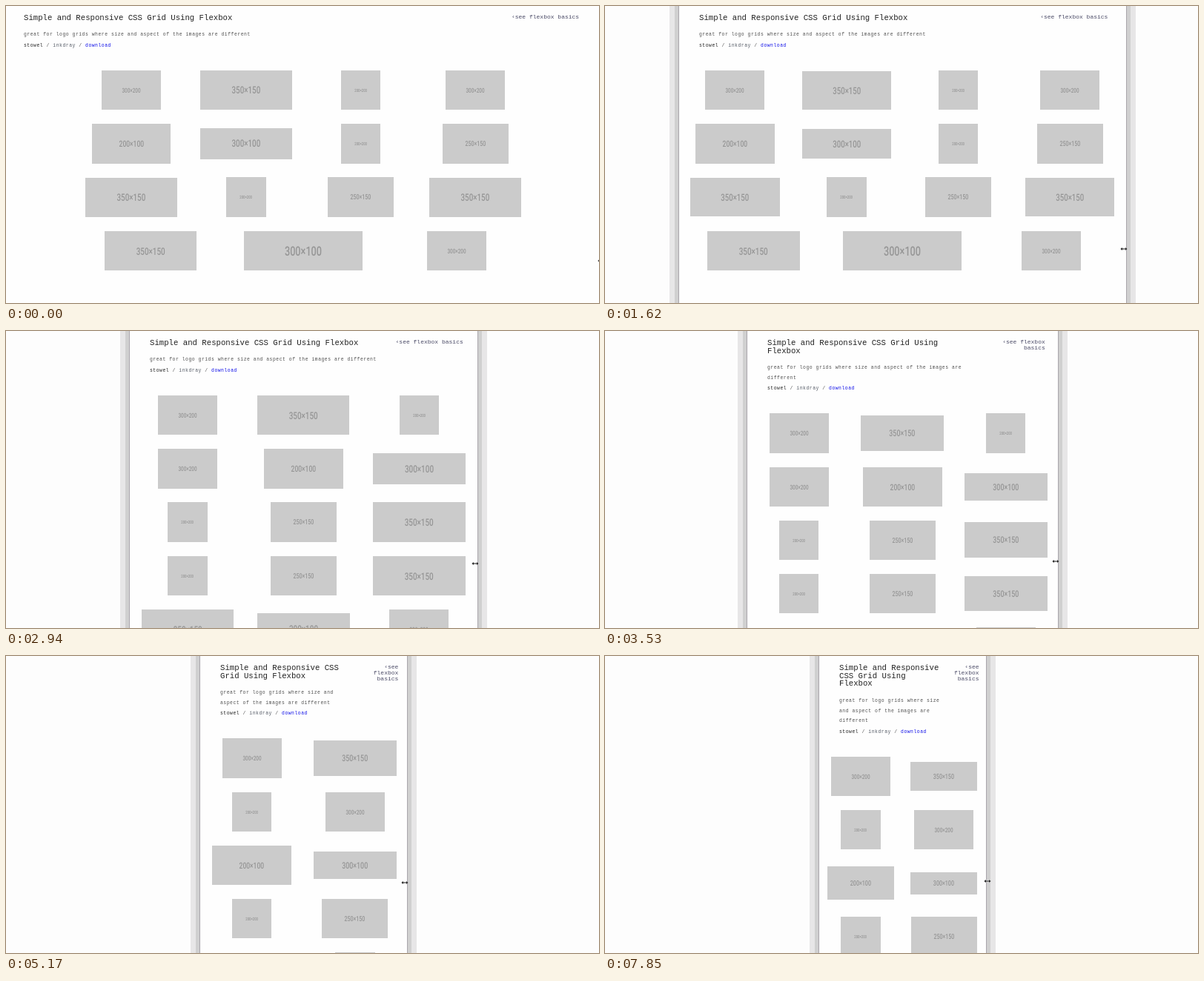
Recreate the animation shown at these times as an HTML page. Size 800 by 401 pixels, loop 7990 ms.

```html
<!DOCTYPE html>
<html lang="en">
<head>
<meta charset="utf-8">
<title>Responsive grid</title>
<style>
  html, body { margin: 0; width: 100%; height: 100%; overflow: hidden; background: #fdfdfd; }
  body { position: relative; font-family: "Liberation Mono", monospace; }
  #page {
    position: absolute; top: -20px; height: 441px; box-sizing: border-box; padding-top: 30.8px;
    overflow: hidden; background: #fefefe;
    box-shadow: 0 0 0 1px #aaa6ac, 0 0 0 6px #d0d0d0, 0 0 0 13px #e7e6e7;
  }
  header { margin: 0 0 17px 27px; width: calc(74% - 30px); }
  h1 { margin: 0 0 10.9px; font: 10.67px/10.8px "Liberation Mono", monospace; color: #222; }
  p { margin: 0 0 1.2px; font-size: 6.4px; line-height: 13.5px; letter-spacing: .533px; color: #505050; }
  .repo { color: #222; }
  .pen { color: #555b66; }
  .get { color: #1010e8; }
  #basics {
    position: absolute; top: 30.8px; right: 4%; width: 20%;
    font-size: 8px; line-height: 8px; text-align: right; color: #4a4a66;
  }
  #grid { display: flex; flex-wrap: wrap; max-width: 619px; margin: auto; }
  .cell { flex: 1 1 calc(96% / var(--columns)); height: 72.15px; display: flex; align-items: center; justify-content: center; }
  .cell svg { max-width: 80%; height: auto; background: #cbcbcb; }
  .cell text { font-family: Roboto, sans-serif; font-weight: 500; fill: #969696; text-anchor: middle; text-rendering: geometricPrecision; }
  #cursor { position: absolute; width: 10px; height: 6px; margin: -3px 0 0 -5px; }
</style>
</head>
<body>
<div id="page">
  <div id="basics">‹see flexbox basics</div>
  <header>
    <h1>Simple and Responsive CSS Grid Using Flexbox</h1>
    <p>great for logo grids where size and aspect of the images are different</p>
    <p><span class="repo">stowel</span> / <span class="pen">inkdray</span> / <span class="get">download</span></p>
  </header>
  <div id="grid"></div>
</div>
<svg id="cursor" viewBox="-5 -3 10 6">
  <path d="M-4.7 0L-2-2.3V-.7H2V-2.3L4.7 0L2 2.3V.7H-2V2.3Z" fill="#111" stroke="#fff" stroke-width=".4"/>
</svg>
<script>
const LOOP = 7990, STEP = 147.7, CENTER = 401.25, MAX_HEIGHT = 53.33;
const SIZES = ('300×200 350×150 200×200 300×200 200×100 300×100 200×200 250×150 ' +
  '350×150 200×200 250×150 350×150 350×150 300×100 300×200').split(' ');

// [step, left edge of the window, cursor y]
const DRAG = [
  [0, -3, 344], [8, 69, 334], [11, 100, 328], [16, 144, 320], [20, 167, 314], [24, 192, 311],
  [28, 214, 308], [32, 244, 307], [35, 262, 306], [40, 278, 305], [46, 289, 304]
];

const page = document.getElementById('page');
const grid = document.getElementById('grid');
const cursor = document.getElementById('cursor');

grid.innerHTML = SIZES.map(label => {
  const [w, h] = label.split('×').map(Number);
  return `<div class="cell"><svg viewBox="0 0 ${w} ${h}" width="${MAX_HEIGHT * w / h}">
    <text transform="translate(${w / 2} ${h / 2 + w * .039}) scale(.73 1)" font-size="${w * .109}">${label}</text>
  </svg></div>`;
}).join('');

function dragAt(step) {
  const next = DRAG.findIndex(key => key[0] > step);
  if (next < 0) return DRAG[DRAG.length - 1].slice(1);
  const a = DRAG[next - 1], b = DRAG[next];
  const f = (step - a[0]) / (b[0] - a[0]);
  return [1, 2].map(i => a[i] + (b[i] - a[i]) * f);
}

function draw(now) {
  const step = Math.floor((now % LOOP + 16) / STEP);
  const [left, y] = dragAt(step);
  const width = 2 * (CENTER - left);
  page.style.left = left + 'px';
  page.style.width = width + 'px';
  grid.style.setProperty('--columns', width > 480 ? 4 : width > 320 ? 3 : 2);
  cursor.style.left = left + width + (step < 50 ? -3 : 2.5) + 'px';
  cursor.style.top = y + 'px';
}

const start = performance.now();
function tick() {
  draw(performance.now() - start);
  requestAnimationFrame(tick);
}
tick();
</script>
</body>
</html>
```
